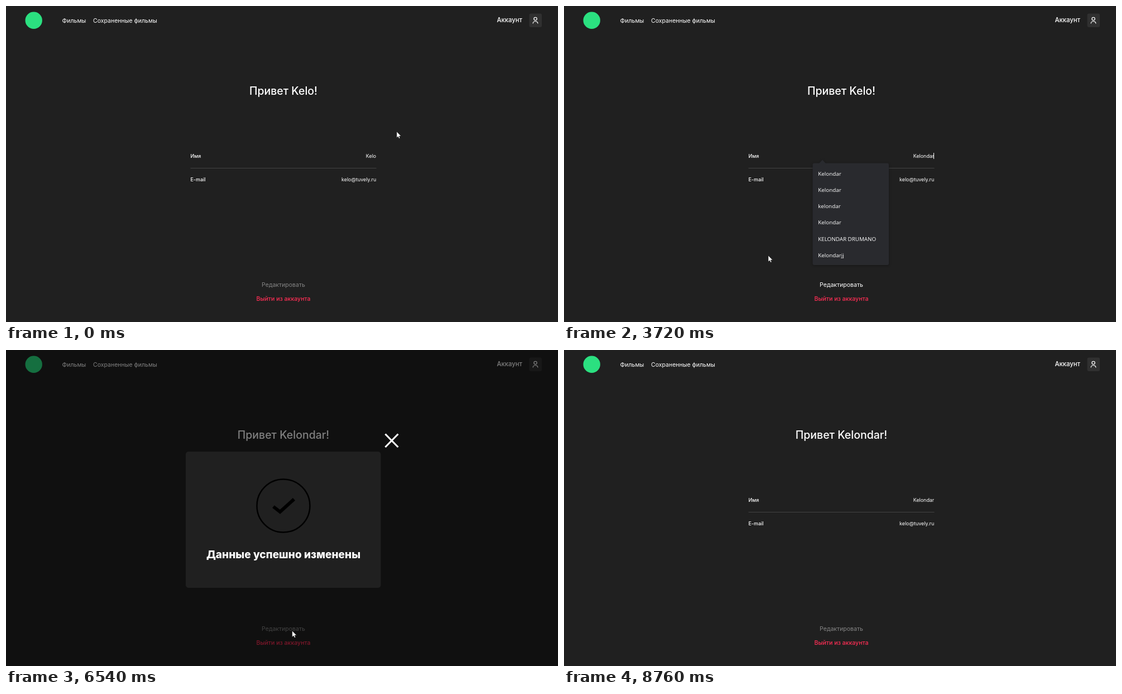
Write an HTML page that moves like this. It is 989 by 566 pixels and loops after 9.35 s.

```html
<!DOCTYPE html>
<html lang="ru">
<head>
<meta charset="utf-8">
<style>
html, body { margin: 0; width: 100%; height: 100%; overflow: hidden; background: #202020; }
svg { display: block; width: 989px; height: 566px; font: 10.54px Inter, sans-serif; fill: #fff; }
.mid { text-anchor: middle; }
.end { text-anchor: end; }
.medium { font-weight: 500; }
.small { font-size: 8.92px; }
.big { font-size: 19.5px; }
.account { font-size: 11.3px; }
.notice { font-size: 19.1px; font-weight: 800; }
.line { fill: none; stroke: #fff; }
#drop rect, #drop path { fill: #292a2e; }
#drop text { font: 9.85px "Open Sans", "Noto Sans", sans-serif; }
#drop { filter: drop-shadow(0 1px 2px rgba(0, 0, 0, .35)); }
</style>
</head>
<body>
<svg viewBox="0 0 989 566">
  <circle cx="49.7" cy="25.7" r="15.2" fill="#2be080"/>
  <text x="100.5" y="30">Фильмы</text>
  <text x="156" y="30">Сохраненные фильмы</text>
  <text x="925" y="29" class="end medium account">Аккаунт</text>
  <rect x="937.5" y="13.5" width="22.5" height="24.5" rx="3" fill="#303030"/>
  <g class="line" stroke-width="1.2">
    <circle cx="948.5" cy="23" r="2.7"/>
    <path d="M944.2 31.5v-.6a4.3 3.4 0 0 1 8.6 0v.6"/>
  </g>

  <text id="title" x="497" y="159" class="mid big medium"></text>
  <text x="330.5" y="272" class="small medium">Имя</text>
  <text id="name" x="663.2" y="272" class="end small"></text>
  <rect id="caret" x="662" y="263" width="1" height="11"/>
  <rect x="330.5" y="290" width="333" height="1" fill="#424242"/>
  <text x="330.5" y="313.5" class="small medium">E-mail</text>
  <text x="663.2" y="313.5" class="end small">kelo@tuvely.ru</text>
  <text id="edit" x="497" y="502.5" class="mid">Редактировать</text>
  <text x="497" y="528" class="mid medium" fill="#ff2e55">Выйти из аккаунта</text>

  <g id="drop">
    <path d="M456.5 282.5L463 275.5L469.5 282.5Z"/>
    <rect id="panel" x="445.5" y="281.5" height="182.5" rx="3"/>
    <g id="rows"></g>
  </g>

  <g id="popup">
    <rect width="989" height="566" fill="#000" opacity=".5"/>
    <rect x="322" y="182" width="349.5" height="244" rx="5" fill="#202020"/>
    <g fill="none" stroke="#000">
      <circle cx="497" cy="279" r="47.5" stroke-width="2.5"/>
      <path d="M479 280.5L491 289.8L516 267.3" stroke-width="6"/>
    </g>
    <text x="497" y="372.5" class="mid notice">Данные успешно изменены</text>
    <path id="cross" class="line" d="M679.5 150.5l23 23.5m0-23.5l-23 23.5" stroke-width="3.2"/>
  </g>

  <circle id="click" r="10" fill="rgba(255,240,20,.5)"/>
  <g id="cursor">
    <path id="arrow" d="M0 0V11L2.5 8.7L4.2 12.3L6 11.5L4.4 8H7.8Z" stroke="#111" stroke-width=".5"/>
    <path id="beam" class="line" d="M-2.5 -5.5H-.6M.6 -5.5H2.5M-2.5 5.5H-.6M.6 5.5H2.5M0 -5V5"/>
    <path id="hand" d="M-.5 1q1-2 2 0v5l5 1.5q1 .5 .7 2l-1 5.5h-6l-4-5.5q.5-1.5 2-.5l1.3 1.3z" stroke="#111" stroke-width=".5"/>
  </g>
</svg>
<script>
const LOOP = 9350, FULL = 'Kelondar', CLICK_IN = 880, CLICK_OUT = 4860, SAVED = 6140;
const keys = [1880, 2080, 2280, 2480];
const pool = ['Kelondar', 'Kelo', 'Kelond', 'Kelonda', 'Kelondar', 'kelo',
  'kelondar', 'Kelondar', 'KELONDAR DRUMANO', 'Kelondarjj'];
const clicks = [[800, 950], [4860, 5060], [5670, 5850]];
// time, x, y of the pointer
const path = [
  [0, 700, 225], [60, 700, 225], [720, 664, 271], [2950, 664, 271], [3010, 664, 274],
  [3200, 674, 330], [3450, 560, 420], [3720, 366, 447], [3860, 366, 447],
  [4200, 430, 480], [4520, 514, 503], [6500, 514, 503], [6630, 510, 503],
  [6750, 510, 503], [6950, 597, 367], [7090, 597, 367], [7350, 679.5, 240.5],
  [7550, 689, 212], [7690, 689, 211], [8040, 691, 216], [8490, 691, 216], [8700, 870, 523]
];

const $ = id => document.getElementById(id);
const show = (id, on) => $(id).setAttribute('visibility', on ? 'visible' : 'hidden');
const within = (t, a, b) => t >= a && t < b;
const ramp = (t, start, length) => Math.min(1, Math.max(0, (t - start) / length));
const smooth = u => u * u * (3 - 2 * u);

function pointer(t) {
  const i = path.findIndex(p => p[0] > t);
  if (i < 0) return path[path.length - 1].slice(1);
  const [a, b] = [path[i - 1], path[i]];
  const u = ramp(t, a[0], b[0] - a[0]);
  return [a[1] + (b[1] - a[1]) * u, a[2] + (b[2] - a[2]) * u];
}

let shown = 0;
function fillRows(value) {
  if (shown === value.length) return;
  shown = value.length;
  const list = pool.filter(s => s.toLowerCase().startsWith(value.toLowerCase())).slice(0, 6);
  $('rows').innerHTML = list.map((s, i) => `<text x="455.2" y="${303.7 + i * 29.25}">${s}</text>`).join('');
  $('panel').setAttribute('width', list.some(s => s.includes(' ')) ? 136.5 : 78.5);
}

function drawCursor(t) {
  const [x, y] = pointer(t);
  const visible = t < 8760;
  const hand = within(t, 4450, SAVED);
  const beam = t < 4000 && within(x, 590, 666) && within(y, 260, 322);
  $('cursor').setAttribute('transform', `translate(${x} ${y})`);
  show('hand', visible && hand);
  show('beam', visible && beam);
  show('arrow', visible && !hand && !beam);
  $('click').setAttribute('cx', x);
  $('click').setAttribute('cy', y);
  show('click', clicks.some(c => within(t, ...c)));
}

function draw(t) {
  const typed = keys.filter(k => t >= k);
  const value = FULL.slice(0, 4 + typed.length);
  $('title').textContent = `Привет ${t < SAVED ? FULL.slice(0, 4) : FULL}!`;
  $('name').textContent = value;

  const focus = typed.length ? typed[typed.length - 1] : CLICK_IN;
  show('caret', within(t, CLICK_IN, CLICK_OUT) && Math.floor((t - focus) / 530) % 2 === 0);
  fillRows(value);
  show('drop', within(t, CLICK_IN, 4930));

  const enabled = t < SAVED ? ramp(t, keys[0], 200) : 0;
  const grey = 133 + 122 * enabled;
  $('edit').setAttribute('fill', `rgb(${grey},${grey},${grey})`);
  $('edit').setAttribute('opacity', 1 - .3 * (ramp(t, 4450, 150) - ramp(t, 6300, 200)));

  $('popup').setAttribute('opacity', smooth(ramp(t, 6122, 300)) - smooth(ramp(t, 7224, 300)));
  show('cross', t > 6260);
  drawCursor(t);
}

const start = performance.now();
function tick() {
  draw((performance.now() - start) % LOOP);
  requestAnimationFrame(tick);
}
tick();
</script>
</body>
</html>
```
